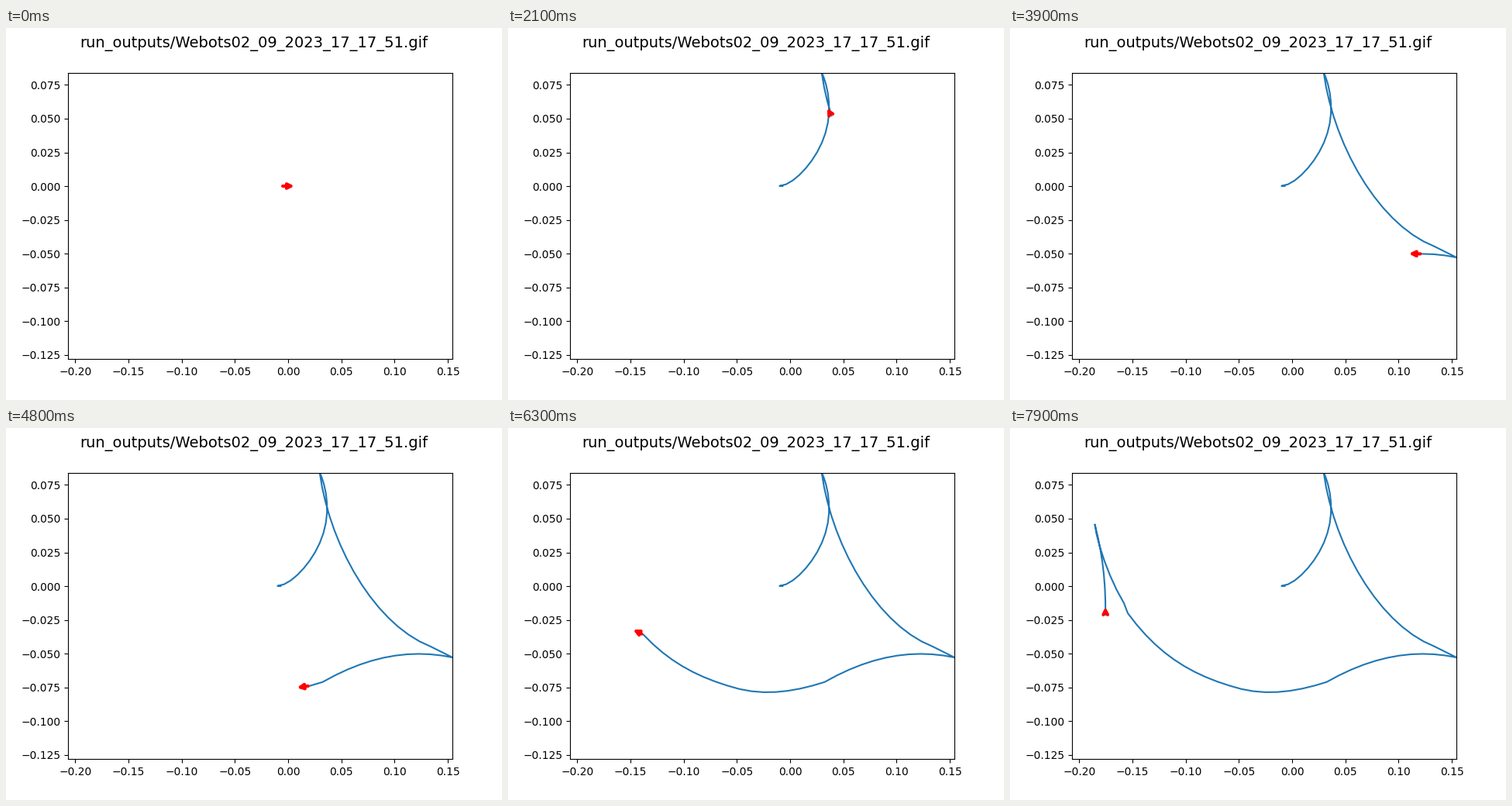
Recreate the animation shown at these times as a matplotlib script. Size 640x480 px, loop 8000 ms.

```python
import matplotlib.pyplot as plt
import numpy as np
from matplotlib.animation import FuncAnimation

plt.rcParams["font.family"] = "DejaVu Sans"

FRAMES, INTERVAL = 80, 100
ORIGIN = np.array([364.08, 204.08])   # stage position of (0, 0)
SCALE = np.array([1374.0, -1742.0])   # stage pixels per unit
ARROW = np.array([0.015, 0.0075])     # arrow reach along x and y
FORWARD, REVERSE = 1, -1

# Each leg: steps, gear, and the places it passes at even intervals of time.
LEGS = [
    (2, REVERSE, [(354.3, 204), (350.4, 203.8)]),
    (15, FORWARD, [(350.4, 203.8), (376, 189.6), (399, 160), (412.6, 123),
                   (412.8, 84.5), (404.8, 57.6)]),
    (1, FORWARD, [(404.8, 57.6), (404.8, 57.6)]),
    (15, REVERSE, [(404.8, 57.6), (431, 150), (481, 231.5), (548, 282)]),
    (3, REVERSE, [(548, 282), (576, 296)]),
    (11, FORWARD, [(576, 296), (522.5, 291.7), (467, 301.8), (408.5, 327.8)]),
    (7, FORWARD, [(408.5, 327.8), (371.6, 337.4), (335, 341), (298.5, 336.8)]),
    (11, FORWARD, [(298.5, 336.8), (243, 317), (195, 286), (152, 239)]),
    (1, FORWARD, [(152, 239), (147, 226)]),
    (6, FORWARD, [(147, 226), (129, 190), (115.8, 153), (109.5, 124.4)]),
    (7, REVERSE, [(109.5, 124.4), (117.5, 162), (122, 200), (123.2, 241)]),
]


def to_data(stage):
    return (np.asarray(stage, float) - ORIGIN) / SCALE


def smooth(points, steps):
    """Positions after each step on the polynomial through the points."""
    t = np.linspace(0, 1, len(points))
    u = np.linspace(0, 1, steps + 1)[1:]
    return np.column_stack([np.polyval(np.polyfit(t, axis, len(t) - 1), u)
                            for axis in to_data(points).T])


def drive():
    """Position and facing of the robot at every step."""
    path, facing = [to_data(LEGS[0][2][0])], [np.array([1.0, 0.0])]
    for steps, gear, points in LEGS:
        for p in smooth(points, steps):
            move = p - path[-1]
            dist = np.hypot(*move)
            facing.append(gear * move / dist if dist > 1e-6 else facing[-1])
            path.append(p)
    return np.array(path), np.array(facing)


path, facing = drive()
tips = path + ARROW * facing

fig, ax = plt.subplots(figsize=(6.4, 4.8), dpi=100)
fig.suptitle("run_outputs/Webots02_09_2023_17_17_51.gif", fontsize=14)
(left, bottom), (right, top) = to_data([(80, 427.2), (576, 57.6)])
ax.set(xlim=(left, right), ylim=(bottom, top))

track, = ax.plot([], [], color="#1f77b4", lw=1.5)
arrow = ax.annotate("", xy=(0, 0), xytext=(0, 0), annotation_clip=False,
                    arrowprops=dict(arrowstyle="->", color="red", lw=3,
                                    mutation_scale=10, shrinkA=2, shrinkB=2))


def update(n):
    track.set_data(*path[:n + 1].T)
    arrow.set_position(path[n])
    arrow.xy = tuple(tips[n])
    return track, arrow


anim = FuncAnimation(fig, update, frames=FRAMES, interval=INTERVAL,
                     repeat=True, repeat_delay=0)
plt.show()
```
